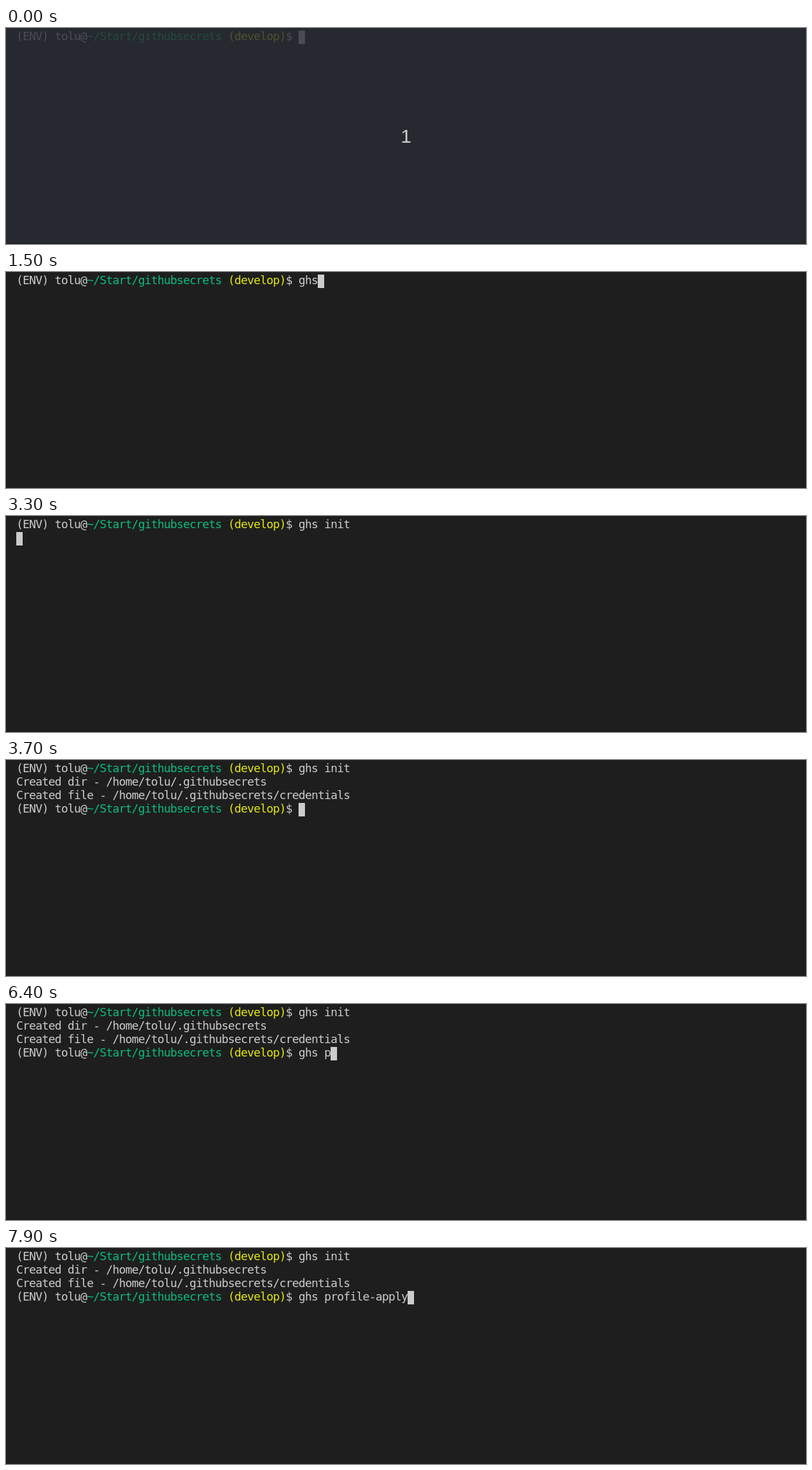
Write an HTML page with a canvas that moves like this. It is 1247 by 337 pixels and loops after 8000 ms.

```html
<!DOCTYPE html>
<html lang="en">
<head>
<meta charset="utf-8">
<title>Terminal session</title>
<style>
  html, body { margin: 0; width: 100%; height: 100%; overflow: hidden; background: #1e1e1e; }
  canvas { display: block; }
</style>
</head>
<body>
<canvas id="stage" width="1247" height="337"></canvas>
<script>
const ctx = document.getElementById('stage').getContext('2d', { alpha: false });
const W = 1247, H = 337, LOOP = 8000;
const LEFT = 16, TOP = 4, CELL = 10, LINE = 21, BASE = 15;
const FG = '#cccccc', GREEN = '#0dbc79', YELLOW = '#e5e510', BG = '#1e1e1e';
const USER = 'tolu', HOME = `/home/${USER}/.githubsecrets`;

const PROMPT = [
  [`(ENV) ${USER}@`, FG],
  ['~/Start/githubsecrets', GREEN],
  [' (develop)', YELLOW],
  ['$ ', FG]
];

// Typing comes in quick bursts; the screen refreshes once per REFRESH.
const KEY = 70, REFRESH = 100;
const INIT = { g: 900, hs: 1360, ' in': 1660, i: 2000, t: 2200 };
const APPLY = {
  gh: 4530, s: 4800, ' ': 5000, p: 6400, rof: 6560,
  ile: 6860, '-': 7200, app: 7390, ly: 7830
};
const COUNTDOWN_END = 500, ENTER = 3300, OUTPUT = 3700;

function typed(bursts, t) {
  let text = '';
  for (const [keys, start] of Object.entries(bursts)) {
    const count = Math.floor((t - start) / KEY) + 1;
    text += keys.slice(0, Math.max(0, count));
  }
  return text;
}

// Draws coloured runs cell by cell and returns the column after the last one.
function drawLine(row, runs) {
  let col = 0;
  for (const [text, color] of runs) {
    ctx.fillStyle = color;
    for (const ch of text) {
      ctx.fillText(ch, LEFT + col * CELL, TOP + row * LINE + BASE);
      col++;
    }
  }
  return col;
}

function drawCursor(row, col) {
  ctx.fillStyle = FG;
  ctx.fillRect(LEFT + col * CELL, TOP + row * LINE, CELL, LINE);
}

function drawCountdown() {
  ctx.fillStyle = 'rgba(40, 44, 52, 0.8)';
  ctx.fillRect(0, 0, W, H - 1);
  ctx.fillStyle = FG;
  ctx.font = '30px "Liberation Sans", Arial, sans-serif';
  ctx.textAlign = 'center';
  ctx.fillText('1', W / 2, 179);
}

function draw(time) {
  const t = Math.floor(time / REFRESH) * REFRESH;
  ctx.fillStyle = BG;
  ctx.fillRect(0, 0, W, H);
  ctx.font = '18px "DejaVu Sans Mono", monospace';
  ctx.textAlign = 'left';

  let row = 0;
  let col = drawLine(0, [...PROMPT, [typed(INIT, t), FG]]);
  if (t >= OUTPUT) {
    drawLine(1, [[`Created dir - ${HOME}`, FG]]);
    drawLine(2, [[`Created file - ${HOME}/credentials`, FG]]);
    row = 3;
    col = drawLine(row, [...PROMPT, [typed(APPLY, t), FG]]);
  } else if (t >= ENTER) {
    row = 1;
    col = 0;
  }
  drawCursor(row, col);
  if (t < COUNTDOWN_END) drawCountdown();
}

const start = performance.now();
function tick() {
  draw((performance.now() - start) % LOOP);
  requestAnimationFrame(tick);
}
tick();
</script>
</body>
</html>
```
